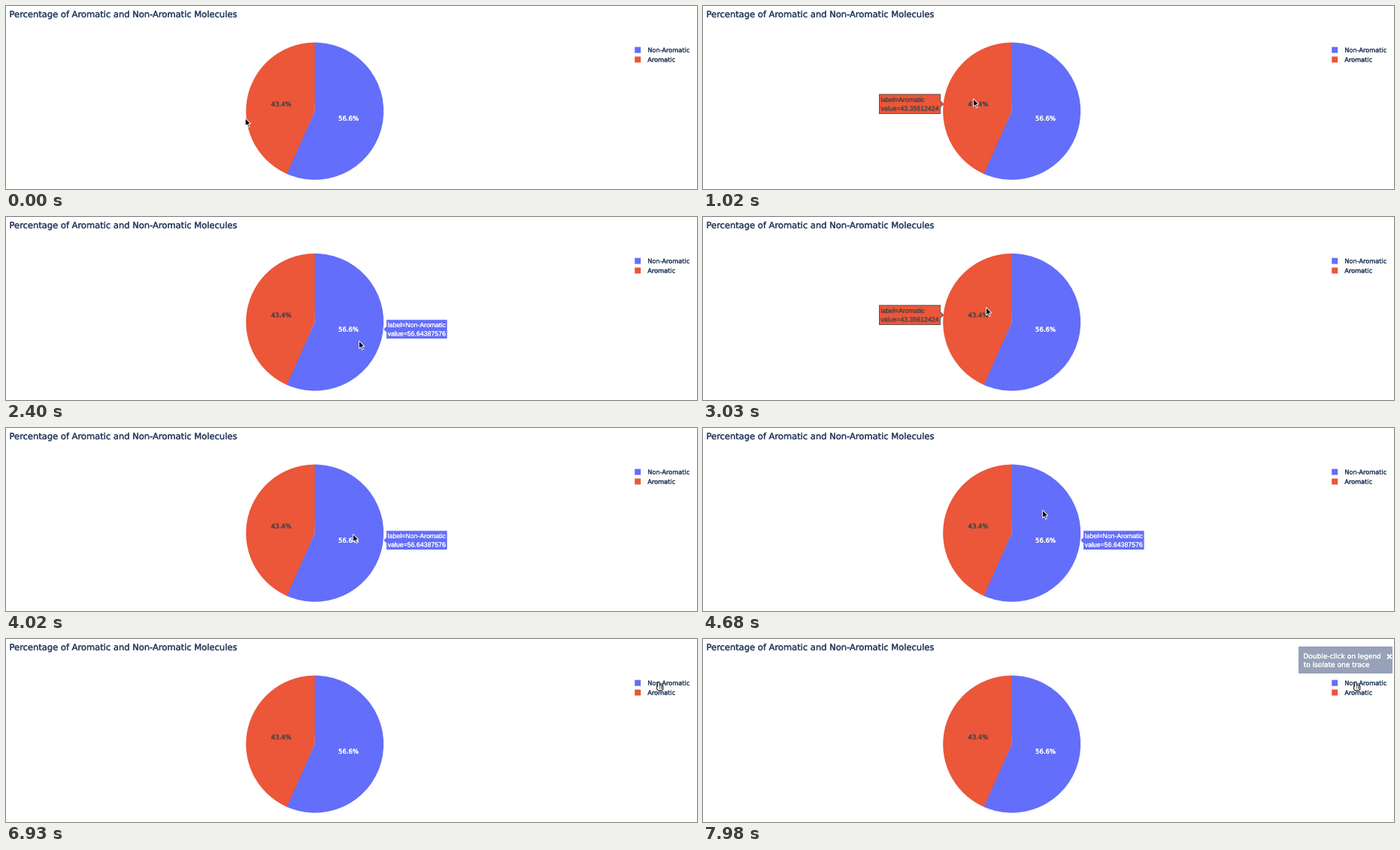
These frames come from a looping animation (919x244 px, 8000 ms). A matplotlib script:

```python
import numpy as np
import matplotlib.pyplot as plt
from matplotlib.animation import FuncAnimation
from matplotlib.patches import FancyBboxPatch, Polygon, Rectangle, Wedge
from matplotlib.patheffects import withStroke

W, H, DPI = 919, 244, 64
PT = 72 / DPI  # points per pixel
LOOP, INTERVAL, TICK = 8000, 20, 30

BLUE, RED = "#636efa", "#ec5639"
NAVY, GREY = "#2a3f5f", "#444444"
CX, CY, R = 410.7, 140.2, 91.5
SHARE = 56.64387576
SPLIT = SHARE * 3.6  # degrees, clockwise from the top

# A legend click hides the first slice, the next click restores it
HIDE, RESTORE, FADE = 6960, 7830, 690

# Pointer moves: start, end, goal x, goal y
HOME = (318.6, 150)
MOVES = [
    (450, 660, 354, 127), (990, 1200, 376, 116), (1500, 2190, 479, 170),
    (2370, 3030, 377, 121), (3300, 4020, 462, 142), (4170, 4680, 452, 110),
    (5010, 5370, 476, 104), (5520, 6030, 672, 84), (6210, 6660, 868, 57),
]

fig = plt.figure(figsize=(W / DPI, H / DPI), dpi=DPI, facecolor="white")
ax = fig.add_axes([0, 0, 1, 1])
ax.set_xlim(0, W)
ax.set_ylim(H, 0)
ax.axis("off")


def text(x, y, s, px, color, font="DejaVu Sans", weight=0.3, **kw):
    return ax.text(x, y, s, fontsize=px * PT, color=color, family=font,
                   va="baseline", **kw,
                   path_effects=[withStroke(linewidth=weight * PT, foreground=color)])


def box(x, y, w, h, color, **kw):
    return ax.add_patch(Rectangle((x, y), w, h, fc=color, lw=0, **kw))


def shape(pts, fill, edge, px, z):
    return ax.add_patch(Polygon(pts, closed=True, fc=fill, ec=edge,
                                lw=px * PT, zorder=z, joinstyle="miter"))


def pie_slice(start, end, color, z):
    return ax.add_patch(Wedge((CX, CY), R, start - 90, end - 90,
                              fc=color, lw=0, zorder=z))


def middle(start, end):
    """Point halfway out along the middle of a slice."""
    a = np.radians((start + end) / 2)
    return CX + R / 2 * np.sin(a), CY - R / 2 * np.cos(a)


def hover_label(side, y, fill, ink, border, name, value):
    """Label box whose small arrow touches the pie on the given side."""
    tip, edge, far = (CX + side * d for d in (91, 95, 176.3))
    half, a = 12.9, 4
    pts = [(tip, y), (edge, y - a), (edge, y - half), (far, y - half),
           (far, y + half), (edge, y + half), (edge, y + a)]
    lines = (f"label={name}", f"value={value:.8f}")
    rows = [text(min(edge, far) + 2, y - 2.8 + 11.6 * k, s, 8.75, ink,
                 "Liberation Sans", 0.1, zorder=5)
            for k, s in enumerate(lines)]
    return [shape(pts, fill, border, 0.8, 4)] + rows


def hand_cursor(x, y):
    """Pointing hand: palm, raised finger and knuckle lines."""
    def part(px, py, w, h, r, **kw):
        return ax.add_patch(FancyBboxPatch(
            (x + px, y + py), w, h, boxstyle=f"round,pad=0,rounding_size={r}",
            fc="white", **kw))

    outline = dict(ec="black", lw=0.9 * PT)
    parts = [part(-2.4, 4.2, 8.4, 7.4, 2.6, zorder=9, **outline),
             part(-1.2, 0, 2.4, 7, 1.1, zorder=9, **outline),
             part(-0.8, 4, 1.8, 4, 0.3, zorder=9, lw=0)]
    for k in (1.3, 2.7, 4.1):
        parts += ax.plot([x + k, x + k], [y + 5, y + 8.5], color="black",
                         lw=0.5 * PT, zorder=10)
    return parts


text(4.5, 15, "Percentage of Aromatic and Non-Aromatic Molecules", 11.5, NAVY)

# The red slice reaches a little under the blue one, so no seam shows
blue_slice = pie_slice(0, SPLIT, BLUE, 2)
red_slice = pie_slice(SPLIT - 1, 361, RED, 1)
blue_mid, red_mid = middle(0, SPLIT), middle(SPLIT, 360)
blue_pct = text(blue_mid[0], blue_mid[1] + 3.1, "56.6%", 8.5, "white", ha="center")
red_pct = text(red_mid[0], red_mid[1] + 3.1, "43.4%", 8.5, GREY, ha="center")

legend = []
for k, (name, color) in enumerate([("Non-Aromatic", BLUE), ("Aromatic", RED)]):
    y = 58.6 + 12.8 * k
    legend.append([box(836.2, y - 4, 8, 8, color, snap=False),
                   text(853.3, y + 3, name, 8.2, NAVY)])

labels = {
    "blue": hover_label(1, blue_mid[1], BLUE, "white", "white",
                        "Non-Aromatic", SHARE),
    "red": hover_label(-1, red_mid[1], RED, GREY, GREY,
                       "Aromatic", 100 - SHARE),
}

notice = [
    box(792, 10, 125, 36, "#8c97af", zorder=6),
    text(798.3, 26, "Double-click on legend", 9.05, "white", zorder=7),
    text(798.7, 37.3, "to isolate one trace", 9.05, "white", zorder=7),
    text(913, 26.9, "×", 11, "white", weight=0.6, fontweight="bold",
         ha="center", zorder=7),
]

ARROW = np.array([(0, 0), (0, 10.4), (2.4, 8.3), (4, 12), (5.7, 11.3),
                  (4.1, 7.6), (7.3, 7.4)])
arrow = shape(ARROW, "black", "white", 0.9, 9)
hand = hand_cursor(*MOVES[-1][2:])


def progress(t, start, end):
    return min(max((t - start) / (end - start), 0), 1)


def pointer(t):
    x, y = HOME
    for start, end, gx, gy in MOVES:
        u = 1 - (1 - progress(t, start, end)) ** 2
        x, y = x + (gx - x) * u, y + (gy - y) * u
    return x, y


def slice_at(x, y):
    dx, dy = x - CX, y - CY
    if np.hypot(dx, dy) > R:
        return None
    angle = (np.degrees(np.arctan2(dy, dx)) + 90) % 360
    return "blue" if angle < SPLIT else "red"


def show(artists, on):
    for a in artists:
        a.set_visible(on)


def update(i):
    t = (i * INTERVAL + INTERVAL // 2) // TICK * TICK
    x, y = pointer(t)
    over_legend = x > 835 and 52 < y < 77
    show([arrow], not over_legend)
    show(hand, over_legend)
    arrow.set_xy(ARROW + (x - 0.4, y - 0.5))

    over = slice_at(x, y)
    for name, parts in labels.items():
        show(parts, name == over)

    hidden = HIDE <= t < RESTORE
    show([blue_slice, blue_pct], not hidden)
    red_slice.set_theta1((1 if hidden else SPLIT - 1) - 90)
    red_pct.set_text("100%" if hidden else "43.4%")
    px, py = (CX, CY) if hidden else red_mid
    red_pct.set_position((px, py + 3.1))
    for a in legend[0]:
        a.set_alpha(0.5 if hidden else 1)

    u = progress(t, HIDE - TICK, HIDE - TICK + FADE)
    fade = u * u * (3 - 2 * u)
    show(notice, fade > 0)
    for a in notice:
        a.set_alpha(0.9 * fade)
    return []


anim = FuncAnimation(fig, update, frames=LOOP // INTERVAL, interval=INTERVAL,
                     init_func=lambda: update(0), repeat=True, repeat_delay=0)
plt.show()
```
